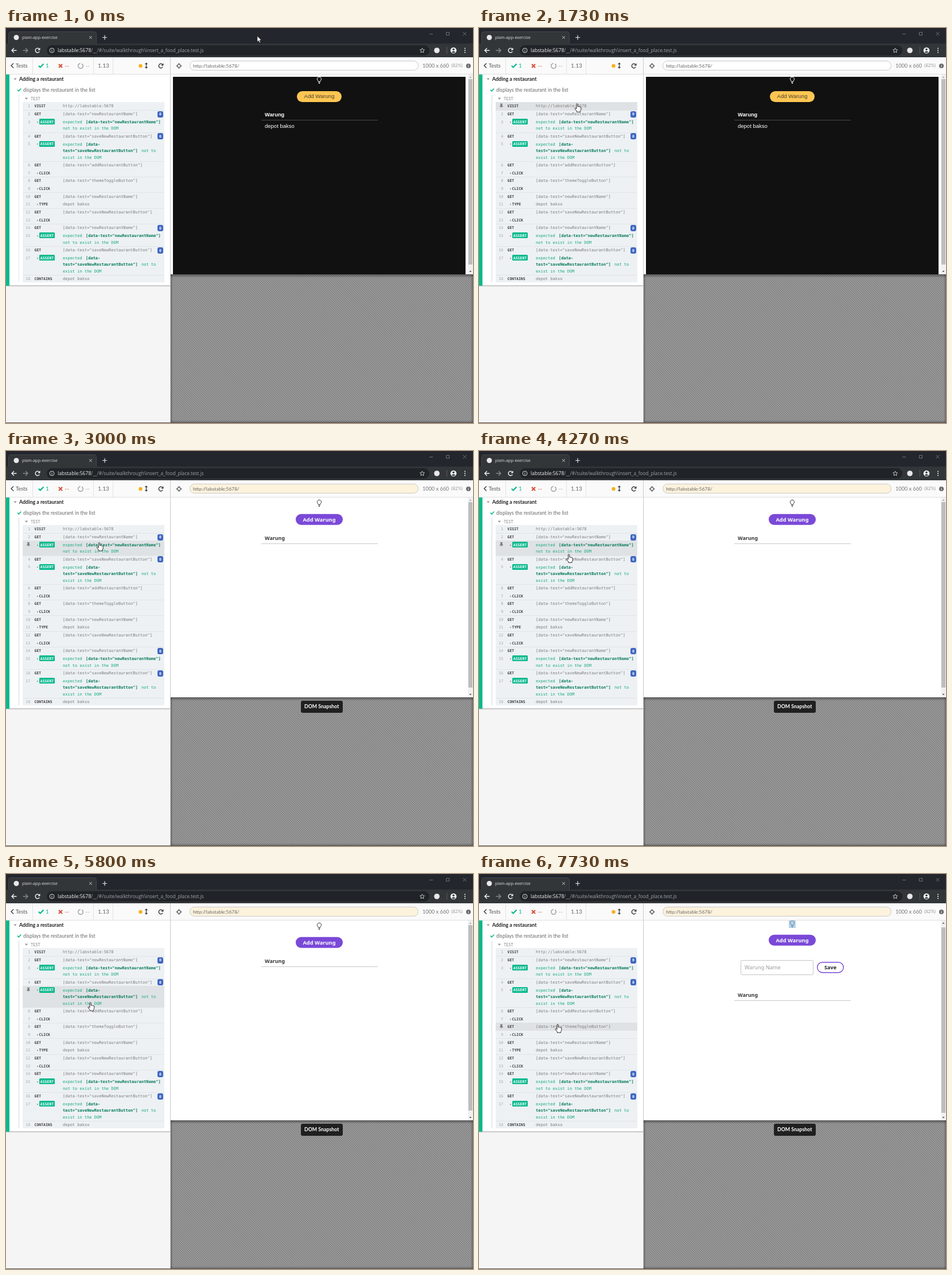
Write an HTML page with a canvas that moves like this. It is 814 px wide and 688 px high and loops after 8000 ms.

```html
<!DOCTYPE html>
<html lang="en">
<head>
<meta charset="utf-8">
<title>Test runner</title>
<style>
html, body { margin: 0; width: 100%; height: 100%; overflow: hidden; background: #f5f5f5; }
canvas { display: block; }
</style>
</head>
<body>
<canvas id="stage" width="814" height="688"></canvas>
<script>
const c = document.getElementById('stage').getContext('2d');
const LOOP = 8000, TICK = 1000 / 15;
const LATO = 'Lato, sans-serif', OPEN = '"Open Sans", sans-serif', NOTO = '"Noto Sans", sans-serif';
const ARIAL = '"Liberation Sans", sans-serif', MONO = '"DejaVu Sans Mono", monospace';
const HOST = 'labstable:5678', DISH = 'depot bakso';
const GREEN = '#08b98c', PURPLE = '#7a49d8';

// Pointer path: tick, x, y
const path = [
  [1, 438, 14], [5, 335, 8], [8, 215, 18], [11, 146, 30], [14, 146, 30], [16, 148, 28],
  [20, 160, 72], [24, 171, 120], [26, 171, 131.5], [27, 169, 134], [28, 168.5, 135],
  [30, 168, 136], [37, 168, 136], [47, 161, 165], [56, 161, 165], [64, 156.5, 179.5],
  [68, 154, 189], [69, 154, 189], [76, 150, 214], [81, 150, 214], [87, 147, 223.5],
  [93, 142, 240], [97, 142, 240], [101, 139.5, 249.5], [105, 139, 254], [112, 139, 254],
  [116, 137, 261.5]
];

const attr = name => `[data-test="${name}"]`;
const NAME = 'newRestaurantName', SAVE = 'saveNewRestaurantButton';
const rows = [
  ['VISIT', 'http://' + HOST],
  ['GET', attr(NAME), 1], ['ASSERT', NAME], ['GET', attr(SAVE), 1], ['ASSERT', SAVE],
  ['GET', attr('addRestaurantButton')], ['-CLICK'],
  ['GET', attr('themeToggleButton')], ['-CLICK'],
  ['GET', attr(NAME)], ['-TYPE', DISH],
  ['GET', attr(SAVE)], ['-CLICK'],
  ['GET', attr(NAME), 1], ['ASSERT', NAME], ['GET', attr(SAVE), 1], ['ASSERT', SAVE],
  ['CONTAINS', DISH]
];
const LINE = 11.5;
const tops = [129.1];
for (const [label, arg] of rows) {
  const extra = label !== 'ASSERT' ? 0 : arg === NAME ? 1 : 2;
  tops.push(tops[tops.length - 1] + 13.65 + extra * LINE);
}

function rect(x, y, w, h, fill) {
  c.fillStyle = fill;
  c.fillRect(x, y, w, h);
}
function round(x, y, w, h, r, fill, line, lw = 1) {
  c.beginPath();
  c.roundRect(x, y, w, h, r);
  if (fill) { c.fillStyle = fill; c.fill(); }
  if (line) { c.strokeStyle = line; c.lineWidth = lw; c.stroke(); }
}
function disc(x, y, r, fill) {
  c.beginPath();
  c.arc(x, y, r, 0, 7);
  c.fillStyle = fill;
  c.fill();
}
// y is the middle of the capitals
function text(s, x, y, size, color, face, weight = 400, align = 'left') {
  c.font = `${weight} ${size}px ${face}`;
  c.textAlign = align;
  c.fillStyle = color;
  c.fillText(s, x, y + size * 0.36);
}
function shape(d, x, y, fill, line, lw = 1) {
  const p = new Path2D(d);
  c.save();
  c.translate(x, y);
  if (fill) { c.fillStyle = fill; c.fill(p); }
  if (line) { c.strokeStyle = line; c.lineWidth = lw; c.stroke(p); }
  c.restore();
}
function shade(x, y, w, h, dx, dy, alpha) {
  const g = c.createLinearGradient(dx < 0 ? x + w : x, dy < 0 ? y + h : y,
    dx > 0 ? x + w : x, dy > 0 ? y + h : y);
  g.addColorStop(0, `rgba(0,0,0,${alpha})`);
  g.addColorStop(1, 'rgba(0,0,0,0)');
  rect(x, y, w, h, g);
}
function reload(x, y, r, color) {
  c.beginPath();
  c.arc(x, y, r, 0.5, 5.4);
  c.strokeStyle = color;
  c.lineWidth = 1.4;
  c.stroke();
  shape('M4.5 -4.8 V-.6 H.3 Z', x, y, color);
}
function info(x, y, fill, mark, line) {
  disc(x, y, 4, fill);
  if (line) { c.strokeStyle = line; c.lineWidth = 1; c.stroke(); }
  rect(x - 0.5, y - 2.4, 1, 1.1, mark);
  rect(x - 0.5, y - 0.6, 1, 3, mark);
}

const tile = document.createElement('canvas');
tile.width = tile.height = 4;
const tc = tile.getContext('2d');
tc.fillStyle = '#999';
tc.fillRect(0, 0, 4, 4);
for (let i = 0; i < 4; i++) {
  tc.fillStyle = '#808080';
  tc.fillRect(i, i, 1, 1);
  tc.fillStyle = '#8c8c8c';
  tc.fillRect((i + 1) % 4, i, 1, 1);
}
const hatch = c.createPattern(tile, 'repeat');

function browser() {
  rect(0, 0, 814, 28, '#23262c');
  round(4.5, 6.5, 153, 24, [4, 4, 0, 0], '#323639', '#44484d');
  rect(0, 27, 814, 24, '#323639');
  disc(18, 16.5, 4.5, '#e8e8ea');
  text('plain-app-exercise', 28, 16.5, 7.3, '#dcdfe3', OPEN);
  shape('M-2.2 -2.2 L2.2 2.2 M2.2 -2.2 L-2.2 2.2', 147.5, 16.5, null, '#d5d7da');
  shape('M-4 0 H4 M0 -4 V4', 172, 16.5, null, '#e2e4e6', 1.2);
  shape('M738 10.5 H744 M767.5 7.5 h5 v5 h-5 Z M796.5 7 l6 6 m0 -6 l-6 6', 0, 0, null, '#777a7f', 0.9);
  for (const [x, flip, color] of [[14, 1, '#f1f3f4'], [34, -1, '#85888c']]) {
    c.save();
    c.translate(x, 39);
    c.scale(flip, 1);
    shape('M4.5 0 H-4 M0 -4 L-4 0 L0 4', 0, 0, null, color, 1.4);
    c.restore();
  }
  reload(55, 39, 3.8, '#f1f3f4');
  round(71, 30, 667, 18, 9, '#202327');
  info(80, 39, '#202327', '#cfd2d5', '#cfd2d5');
  text(HOST, 90, 39, 8.6, '#f0f2f4', OPEN);
  const w = c.measureText(HOST).width;
  text('/__/#/suite/walkthrough\\insert_a_food_place.test.js', 90 + w, 39, 8.3, '#a1a5aa', OPEN);
  shape('M0 -4 L1.2 -1.3 L4 -1 L1.9 .9 L2.5 3.8 L0 2.3 L-2.5 3.8 L-1.9 .9 L-4 -1 L-1.2 -1.3 Z', 725.5, 39, null, '#d5d7da', 0.9);
  disc(751, 39, 4.8, '#e8e8ea');
  rect(768, 33, 1, 12, '#575b60');
  disc(780, 39, 5.3, '#f1f3f4');
  disc(780, 37.2, 1.7, '#323639');
  shape('M-3.2 3 Q0 -.4 3.2 3 Q0 5.6 -3.2 3', 780, 39, '#323639');
  for (let i = -1; i < 2; i++) disc(800, 39 + i * 3.4, 1, '#f1f3f4');
}

function toolbar(live) {
  rect(0, 51, 814, 30, '#fafafa');
  rect(0, 80, 814, 1, '#dedede');
  for (const x of [46, 152, 186]) rect(x, 51, 1, 30, '#e2e2e2');
  shape('M4 -4 L0 0 L4 4', 9, 65.5, null, '#444', 1.5);
  text('Tests', 17, 65.5, 9.3, '#555', LATO);
  shape('M-4.2 .3 L-1.3 3 L4.5 -3', 61, 65.5, null, GREEN, 2.2);
  text('1', 69, 65.5, 10, GREEN, LATO);
  shape('M-3 -3 L3 3 M3 -3 L-3 3', 95, 66, null, '#d9513c', 2.2);
  text('--', 102.5, 65.5, 10, '#d9513c', LATO);
  c.beginPath();
  c.arc(130, 66, 4.3, -1, 4.6);
  c.strokeStyle = '#999';
  c.lineWidth = 1.4;
  c.stroke();
  text('--', 138.5, 65.5, 10, '#aaa', LATO);
  text('1.13', 160, 65.5, 10, '#666', LATO);
  disc(234.5, 66, 3.2, '#f8b11c');
  shape('M0 -4 V4 M-2 -2.3 L0 -4.4 L2 -2.3 M-2 2.3 L0 4.4 L2 2.3', 244.5, 65.5, null, '#333', 1.2);
  reload(270, 66, 3.7, '#333');
  c.beginPath();
  c.arc(301.5, 66, 3.2, 0, 7);
  c.strokeStyle = '#444';
  c.lineWidth = 1;
  c.stroke();
  shape('M-5 0 H-1.4 M1.4 0 H5 M0 -5 V-1.4 M0 1.4 V5', 301.5, 66, null, '#444');
  round(320.5, 57.5, 398, 16, 8, live ? '#fff' : '#fdf2dc', '#cacaca');
  text(`http://${HOST}/`, 326, 65.5, 8.4, '#666', LATO);
  text('1000 x 660', 726, 65.5, 9.1, '#777', LATO);
  text('(82%)', 776, 65.5, 8, '#999', LATO);
  info(806, 66, '#666', '#fff');
}

function assertion(name, y) {
  const say = (s, x, line) => text(s, x, y + line * LINE, 7, '#15a87f', MONO);
  const strong = (s, x, line) => text(s, x, y + line * LINE, 7, '#067a5c', MONO, 700);
  round(58, Math.round(y - 5), 27, 10, 1.5, GREEN);
  text('-', 53, y, 6.45, '#444', MONO, 700);
  text('ASSERT', 71.5, y, 6.45, '#fff', MONO, 700, 'center');
  say('expected', 99, 0);
  if (name === NAME) {
    strong(attr(name), 139, 0);
    say('not to exist in the DOM', 99, 1);
  } else {
    strong('[data-', 139, 0);
    strong(`test="${name}"]`, 99, 1);
    say('not to', 236, 1);
    say('exist in the DOM', 99, 2);
  }
}

function sidebar(active, inside) {
  rect(0, 81, 286, 607, '#f5f5f5');
  shade(0, 448, 286, 3, 0, 1, 0.25);
  rect(0, 81, 286, 367, '#fff');
  rect(0, 81, 6, 368, GREEN);
  shape('M-2.5 -1.5 H2.5 L0 1.7 Z', 16, 89, '#999');
  text('Adding a restaurant', 23, 89, 8.9, '#222', LATO, 700);
  shape('M-3 .2 L-.8 2.3 L3.2 -2', 23, 107.5, null, GREEN, 1.6);
  text('displays the restaurant in the list', 30, 107.5, 8.9, '#666', LATO);
  rect(22, 116, 1, 327, inside ? '#d2d8dc' : '#e2e5e7');
  shape('M-2.8 -1.5 H2.8 L0 1.8 Z', 35.5, 123, '#999');
  text('TEST', 43, 123, 7.3, '#888', LATO);
  rect(29, 129, 247, 314, '#edf1f4');
  rows.forEach(([label, arg, badge], i) => {
    const y = tops[i] + 6.8, top = Math.round(tops[i]), end = Math.round(tops[i + 1]);
    const child = label[0] === '-';
    if (i && !child && label !== 'ASSERT') rect(29, top, 247, 1, '#e0e5e9');
    if (i === active) {
      rect(29, top, 247, end - top, '#dfe2e4');
      shape('M-2.2 -3.8 H2.2 V-3 L1.4 -2.5 V-.5 L3 1 V1.7 H.5 L0 4.4 L-.5 1.7 H-3 V1 L-1.4 -.5 V-2.5 L-2.2 -3 Z', 39, y - 0.4, '#777');
    } else {
      text(i + 1, 42.3, y, 6.6, '#a4a8ab', MONO, 400, 'right');
    }
    if (label === 'ASSERT') return assertion(arg, y);
    if (child) text('-', 53, y, 6.45, '#444', MONO, 700);
    text(child ? label.slice(1) : label, child ? 57.5 : 49.5, y, 6.45, '#3d3d3d', MONO, 700);
    if (arg) text(arg, 99, y, 7, '#7b7b7b', MONO);
    if (badge) {
      round(264, Math.round(y - 5), 10, 11, 3, '#4067c2');
      text('0', 269, y + 0.6, 6.4, '#fff', MONO, 700, 'center');
    }
  });
  rect(286, 51, 1, 637, '#c9c9c9');
}

function bulb(y, color) {
  shape('M-1.7 2.4 Q-1.7 1.3 -2.7 .2 A3.6 3.6 0 1 1 2.7 .2 Q1.7 1.3 1.7 2.4 Z M-1.5 4 H1.5 M-1 5.5 H1', 546, y, null, color, 1);
}

function scrollbar(shift) {
  rect(805, 81, 9, 348, '#f1f1f1');
  rect(806, 89 + shift, 7, 323, '#bdbdbd');
  shape('M-2 1 L0 -1.2 L2 1 Z', 809.5, 85.5, shift ? '#444' : '#999');
  shape('M-2 -1 L0 1.2 L2 -1 Z', 809.5, 424, '#444');
}

function darkPage() {
  rect(291, 85, 510, 344, '#111');
  bulb(91, '#fff');
  round(507, 110, 78, 19, 9.5, '#fdc653');
  text('Add Warung', 546, 119, 9.6, '#4a4030', ARIAL, 400, 'center');
  text('Warung', 451, 151, 9.3, '#fff', ARIAL, 700);
  rect(445, 160, 203, 1, '#4b4b4b');
  text(DISH, 451, 171, 9.5, '#fff', ARIAL);
}

// view: 1 plain, 2 button marked, 3 button clicked, 4 form open
function lightPage(view) {
  const shift = [0, 0, 8.5, 8.5, 4][view], marked = view === 2 || view === 3;
  if (view === 4) rect(540, 81, 12, 13, '#b5d2ea');
  bulb(91 - shift, view === 4 ? '#64849c' : '#3a3a3a');
  const y = 119.3 - shift;
  if (marked) rect(505, y - 9.5, 82, 19, '#d3d0a8');
  round(505, y - 9.5, 82, 19, 9.5, marked ? '#c0aa7e' : PURPLE);
  if (marked) rect(517, y - 6, 58, 12, '#a5b2b0');
  text('Add Warung', 546, y, 9.25, marked ? '#a5cae8' : '#fff', NOTO, 700, 'center');
  if (view === 3) {
    disc(545.5, 111, 4, '#f3aaa5');
    disc(545.5, 111, 3.2, '#dc2f2f');
    disc(545.5, 111, 1.1, '#fff');
  }
  let head = 151.5 - shift;
  if (view === 4) {
    head = 210.5;
    round(456.5, 150.5, 126, 25, 2, '#fff', '#c4c4c4');
    text('Warung Name', 463, 163, 9.2, '#999', NOTO);
    round(589.7, 153.7, 45.6, 18, 9, '#fff', PURPLE, 1.4);
    text('Save', 612.5, 162.8, 9.1, '#222', NOTO, 700, 'center');
  }
  text('Warung', 451, head, 8.9, '#363636', NOTO, 700);
  rect(445, Math.round(head + 9.2), 203, 1, '#c8c8c8');
}

function preview(view) {
  rect(287, 429, 527, 259, hatch);
  shade(287, 429, 527, 6, 0, 1, 0.4);
  shade(287, 429, 4, 259, 1, 0, 0.28);
  shade(810, 429, 4, 259, -1, 0, 0.28);
  shade(287, 683, 527, 5, 0, -1, 0.28);
  rect(0, 687, 814, 1, '#555');
  rect(287, 81, 527, 348, '#fff');
  c.save();
  c.beginPath();
  c.rect(287, 81, 518, 348);
  c.clip();
  if (view) lightPage(view); else darkPage();
  c.restore();
  scrollbar([0, 0, 8, 8, 4][view]);
  if (!view) return;
  const before = view === 3, x = before ? 499 : 514;
  round(x, 435, before ? 103 : 73, 21, 3, '#202020');
  text(before ? 'DOM Snapshot:' : 'DOM Snapshot', x + 6, 445, 8.8, '#fff', LATO, 700);
  if (before) text('before', 570, 445, 9, '#eda03f', LATO);
}

function pointer(x, y) {
  if (y >= 82) {
    shape('M-1 1 Q.2 -.6 1.2 1 V5.5 Q2.5 4.6 3.3 5.8 Q4.8 5 5.3 6.3 Q6.6 5.8 6.8 7.3 V10 Q6.8 12 5.5 13.2 V14.8 H-.6 V13.4 L-3.9 9.2 Q-4.2 7.8 -2.6 8 L-1 9.2 Z', x, y, '#fff', '#111', 0.9);
  } else {
    shape('M0 0 V10 L2.3 8 L3.8 11.5 L5.5 10.8 L4 7.3 H7 Z', x, y, '#fff', '#222', 0.6);
  }
}

function pose(tick) {
  const i = path.findIndex(k => k[0] > tick);
  if (i === 0) return path[0].slice(1);
  if (i < 0) return path[path.length - 1].slice(1);
  const a = path[i - 1], b = path[i], k = (tick - a[0]) / (b[0] - a[0]);
  return [a[1] + (b[1] - a[1]) * k, a[2] + (b[2] - a[2]) * k];
}

function draw(tick) {
  const [x, y] = pose(tick);
  const active = tops.findIndex((top, i) => y >= top && y < tops[i + 1]);
  let view = 0;
  if (tick >= 27) view = active < 5 ? 1 : active - 3;
  browser();
  toolbar(!view);
  sidebar(active, y >= 116);
  preview(view);
  pointer(x, y);
}

let last = -1;
function frame() {
  const tick = Math.floor((performance.now() % LOOP + 4) / TICK);
  if (tick !== last) draw(last = tick);
  requestAnimationFrame(frame);
}
frame();
</script>
</body>
</html>
```
